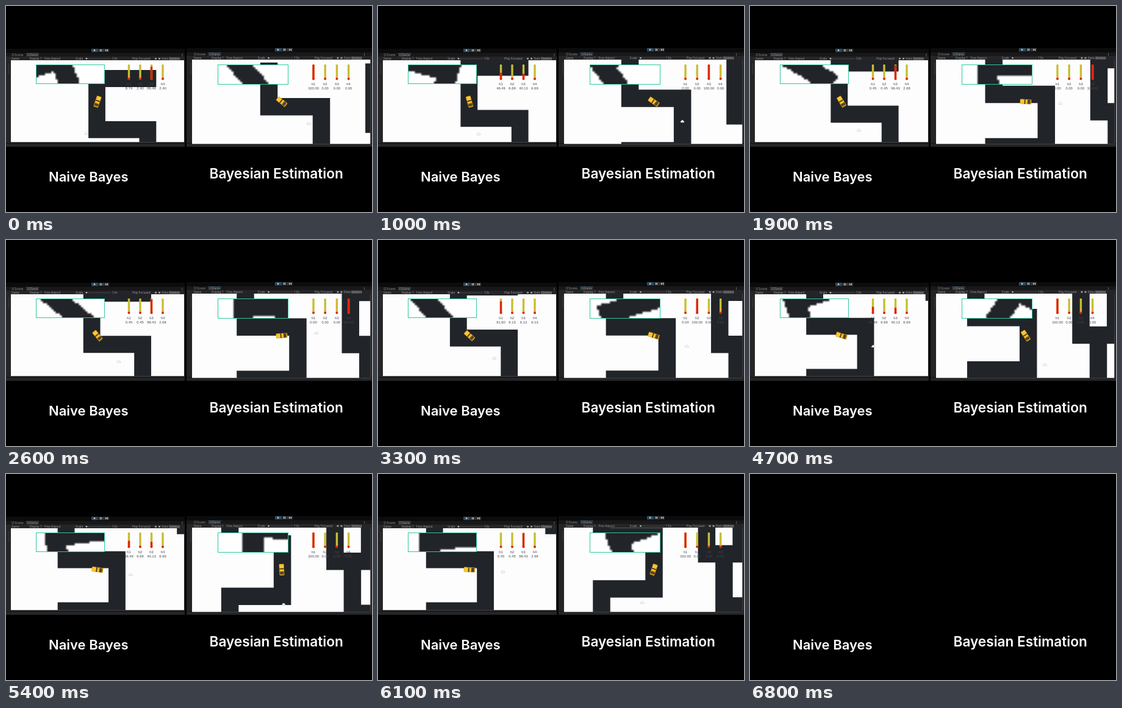
Write an HTML page with a canvas that moves like this. It is 600 by 338 pixels and loops after 6900 ms.

```html
<!DOCTYPE html>
<html lang="en">
<head>
<meta charset="utf-8">
<title>Naive Bayes and Bayesian Estimation</title>
<style>
  html, body { margin: 0; width: 100%; height: 100%; overflow: hidden; background: #000; }
  svg { position: absolute; left: 0; top: 0; }
  canvas { position: absolute; box-sizing: border-box; border: 1.3px solid #2cc9a2; }
  .ui { font: 4.7px Inter, Roboto, sans-serif; fill: #999; }
  .meter { font: 5.8px "Liberation Sans", Arial, sans-serif; fill: #43464b; text-anchor: middle; }
  .caption { font-family: Inter, "Open Sans", sans-serif; font-weight: 600; fill: #fff; }
</style>
</head>
<body>
<svg id="stage" width="600" height="338" viewBox="0 0 600 338"></svg>
<script>
const LOOP = 6900, STEP = 100, BLACKOUT = 6800, PHASE = 1300;
const ROAD = '#212429', YELLOW = '#c9bd32', RED = '#e4230f';
const LOOKAHEAD = 22, SENSOR_SCALE = 1.22, COLS = 32, ROWS = 9;
const stage = document.getElementById('stage');

function add(parent, tag, attrs = {}, text) {
  const el = document.createElementNS('http://www.w3.org/2000/svg', tag);
  for (const key in attrs) el.setAttribute(key, attrs[key]);
  if (text !== undefined) el.textContent = text;
  parent.appendChild(el);
  return el;
}
const box = (parent, x, y, width, height, fill, extra = {}) =>
  add(parent, 'rect', { x, y, width, height, fill, ...extra });
const label = (parent, cls, x, y, text, extra = {}) =>
  add(parent, 'text', { class: cls, x, y, ...extra }, text);

// Roads are centre lines; travel and heading are keys spread evenly over the loop
const panels = [
  {
    frame: [0, 70, 293, 161], view: [8, 89, 284, 134.5], offset: [0, 0], zoom: '1.0x',
    car: [150, 157], reach: 55, sensor: [48.5, 96, 113, 32], meterX: 201.5, pitch: 18.5,
    road: 'M232.4 119H149v83.8h83.4v83.8H149M344.5 0V147H460', roadWidth: 27.8,
    travel: {
      x: [0, 0, 5.5, 19.5, 41.5, 53.5, 62],
      y: [0, 20.5, 28, 44, 60.5, 62, 62.5],
      heading: [109, 70, 54, 40, 20, 5, 4]
    },
    // Unnormalised support for each hypothesis; the last three sets repeat
    odds(phase) {
      const sets = [[3.64, 1, 36, 1], [6.95, 1, 6, 1], [1, 1, 216, 6], [13.3, 1, 1, 1]];
      return sets[phase > 3 ? phase - 3 : phase];
    }
  },
  {
    frame: [296, 69, 304, 162], view: [305, 88, 292.5, 138.5], offset: [298.5, -1], zoom: '1.5x',
    car: [452, 157], reach: 57, sensor: [347, 95.5, 115.5, 33], meterX: 504, pitch: 19.2,
    road: 'M431 107v58.3h86v86h-86v86M703 108.5H603.3v85.5H660v-85.5M631.8 194v85.5H703', roadWidth: 28.5,
    travel: {
      x: [0, 20.3, 36, 44.5, 60, 64.5, 63],
      y: [0, 15.3, 22, 23.5, 36.5, 57, 76],
      heading: [39, 32, -7, 22, 53, 100, 125]
    },
    odds: phase => [0, 1, 2, 3].map(i => +('023100'[phase + 0] === String(i)))
  }
];
panels[1].odds = phase => {
  const winner = [0, 2, 3, 1, 0, 0][phase];
  return [0, 1, 2, 3].map(i => i === winner ? 1 : 0);
};

// Catmull-Rom curve through evenly spaced keys
function track(keys, t) {
  const last = keys.length - 1, pos = t / LOOP * last;
  const i = Math.min(Math.floor(pos), last - 1), u = pos - i, v = 1 - u;
  const slope = k => {
    const p = Math.max(k - 1, 0), n = Math.min(k + 1, last);
    return (keys[n] - keys[p]) / (n - p);
  };
  return keys[i] * (1 + 2 * u) * v * v + keys[i + 1] * u * u * (3 - 2 * u) +
    u * v * (slope(i) * v - slope(i + 1) * u);
}

function buildChrome(g, p) {
  const [x, y, w, h] = p.frame;
  box(g, x, y, w, h, '#252527');
  box(g, x, y, w, 7, '#0c0c0d');
  box(g, x, y + 7, w, 6, '#18181a');
  box(g, x, y + h - 6, w, 1, '#111');

  const bar = add(g, 'g', { transform: `translate(${p.offset})` });
  const play = add(bar, 'g', { transform: `translate(${x ? 142.5 : 140} 70)` });
  box(play, 0, 0, 29, 5.5, '#303234');
  box(play, 0, 0, 10, 5.5, '#2d4d63');
  add(play, 'path', { d: 'M4 1l3 1.8l-3 1.8zM14 1h1v3.6h-1zm2 0h1v3.6h-1zM23 1l2.5 1.8l-2.5 1.8zm3 0h1v3.6h-1z', fill: '#d8d8d8' });

  box(bar, 33, 77, 21, 6, '#2c2e30');
  box(bar, 33, 77, 21, .6, '#335a78');
  box(bar, 267, 84, 18, 5, '#454547');
  add(bar, 'path', { d: 'M10 78.5h3v3h-3zM35 79h4v2.4h-4z', fill: 'none', stroke: '#888', 'stroke-width': .5 });
  const tabs = { Scene: 14.5, Game: 39.5 };
  const tools = {
    Game: 9, 'Display 1': 38.5, 'Free Aspect': 63, Scale: 114, [p.zoom]: 174,
    'Play Focused': 207, Stats: 255, Gizmos: 268
  };
  for (const word in tabs) label(bar, 'ui', tabs[word], 81.7, word);
  for (const word in tools) label(bar, 'ui', tools[word], 87.8, word);
  box(bar, 130, 86, 42, .6, '#555');
  add(bar, 'circle', { cx: 132, cy: 86.3, r: 1.3, fill: '#bbb' });
  for (const bx of [244, 250]) box(bar, bx, 85, 3, 2.6, '#999');
  for (let i = 0; i < 3; i++) box(bar, 288.5, 78.5 + 1.5 * i, .9, .9, '#999');
  box(bar, 4, 94, 1.2, 18, '#3a3a3c');
}

function buildCar(g) {
  const car = add(g, 'g');
  box(car, -9.3, -4, 18.6, 8, '#dba01c', { rx: 1.2 });
  box(car, -8.6, -3.2, 6.4, 6.4, '#ffc629');
  box(car, -2.2, -3.7, 1.6, 7.4, '#3a3018');
  box(car, -.3, -3, 3.3, 6, '#f6bc2b');
  box(car, 3, -3.4, 4.6, 6.8, '#54472a', { rx: .8 });
  return car;
}

function buildMeters(g, p) {
  return [0, 1, 2, 3].map(i => {
    const x = p.meterX + i * p.pitch;
    const strip = fill => box(g, x - 1.7, 96, 3.4, 25, fill, { rx: .8 });
    strip(YELLOW);
    const fill = strip(RED);
    add(g, 'circle', { cx: x, cy: 119.5, r: 1.9, fill: RED });
    label(g, 'meter', x, 129.5, 'h' + (i + 1));
    return { fill, value: label(g, 'meter', x, 136.6, '') };
  });
}

const scene = add(stage, 'g');
const defs = add(stage, 'defs');

panels.forEach((p, i) => {
  buildChrome(scene, p);
  box(add(defs, 'clipPath', { id: 'view' + i }), ...p.view, '#000');
  const view = add(scene, 'g', { 'clip-path': `url(#view${i})` });
  box(view, ...p.view, '#fdfdfd');
  p.world = add(view, 'path', {
    d: p.road, fill: 'none', stroke: ROAD, 'stroke-width': p.roadWidth, 'stroke-linecap': 'square'
  });
  p.marker = add(view, 'path', {
    d: 'M-2.8 1.6q-.6-2 1-2q.4-1.8 2-1.6q1.4 .2 1.4 1.5q1.6 .2 1.2 2.1z',
    fill: '#fff', stroke: '#bdbdbd', 'stroke-width': .6
  });
  p.sprite = buildCar(view);
  p.meters = buildMeters(view, p);

  const [left, top, width, height] = p.sensor.map(n => n + 'px');
  const canvas = p.canvas = document.createElement('canvas');
  canvas.width = COLS;
  canvas.height = ROWS;
  Object.assign(canvas.style, { left, top, width, height });
  document.body.appendChild(canvas);
  p.ctx = canvas.getContext('2d');
  p.ctx.lineWidth = p.roadWidth;
  p.ctx.lineCap = 'square';
  p.route = new Path2D(p.road);
});
label(stage, 'caption', 70, 288, 'Naive Bayes', { 'font-size': 22 });
label(stage, 'caption', 333.5, 283, 'Bayesian Estimation', { 'font-size': 22.6 });

// Coarse picture of the ground ahead, with the heading pointing up
function drawSensor({ ctx, route, sensor }, cx, cy, cos, sin) {
  ctx.fillStyle = '#fff';
  ctx.fillRect(0, 0, COLS, ROWS);
  ctx.fillStyle = ROAD;
  for (let row = 0; row < ROWS; row++) {
    for (let col = 0; col < COLS; col++) {
      const side = ((col + .5) / COLS - .5) * sensor[2] / SENSOR_SCALE;
      const ahead = LOOKAHEAD + (.5 - (row + .5) / ROWS) * sensor[3] / SENSOR_SCALE;
      const x = cx + ahead * cos - side * sin, y = cy + ahead * sin + side * cos;
      if (ctx.isPointInStroke(route, x, y)) ctx.fillRect(col, row, 1, 1);
    }
  }
}

function drawPanel(p, t) {
  const dx = track(p.travel.x, t), dy = track(p.travel.y, t), deg = track(p.travel.heading, t);
  const angle = deg * Math.PI / 180, cos = Math.cos(angle), sin = Math.sin(angle);
  const [cx, cy] = p.car;
  p.world.setAttribute('transform', `translate(${-dx} ${-dy})`);
  p.sprite.setAttribute('transform', `translate(${cx} ${cy}) rotate(${deg})`);
  p.marker.setAttribute('transform', `translate(${cx + p.reach * cos} ${cy + p.reach * sin})`);
  drawSensor(p, cx + dx, cy + dy, cos, sin);

  const odds = p.odds(Math.floor((t + 700) / PHASE));
  const total = odds.reduce((a, b) => a + b);
  p.meters.forEach(({ fill, value }, i) => {
    const belief = odds[i] / total;
    fill.setAttribute('y', 121 - 25 * belief);
    fill.setAttribute('height', 25 * belief);
    value.textContent = (100 * belief).toFixed(2);
  });
}

let shown = -1;
function render(ms) {
  const t = Math.floor((ms % LOOP) / STEP) * STEP;
  if (t === shown) return;
  shown = t;
  const display = t < BLACKOUT ? '' : 'none';
  scene.style.display = display;
  for (const p of panels) {
    p.canvas.style.display = display;
    if (!display) drawPanel(p, t);
  }
}

const start = performance.now();
function tick() {
  render(performance.now() - start);
  requestAnimationFrame(tick);
}
tick();
</script>
</body>
</html>
```
